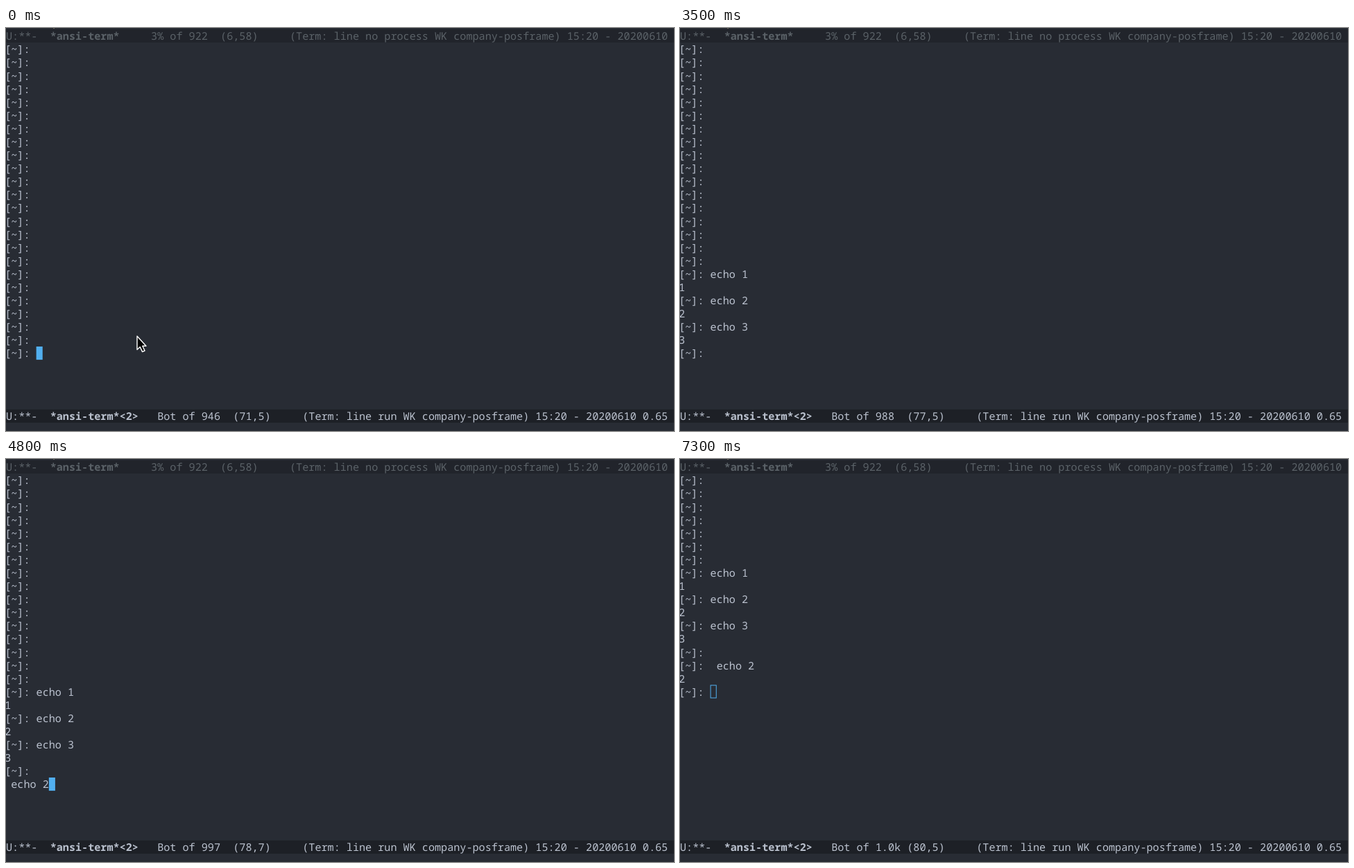
Recreate the animation shown at these times as an HTML page. Size 963x582 px, loop 7500 ms.

```html
<!DOCTYPE html>
<html lang="en">
<head>
<meta charset="utf-8">
<title>Shell history</title>
<style>
  html, body { margin: 0; width: 100%; height: 100%; overflow: hidden; background: #282c34; }
  svg { display: block; width: 963px; height: 582px; }
  text {
    font: 16.6667px "Noto Sans Mono", "DejaVu Sans Mono", monospace;
    white-space: pre;
    text-rendering: geometricPrecision;
  }
  .bold { font-weight: 700; }
</style>
</head>
<body>
<svg id="stage" viewBox="0 0 1059.3 640.2"></svg>
<script>
const LOOP = 7500;
const CW = 10, LH = 21, ASCENT = 17;      // character cell
const LEFT = -2, TOP = 23, BOTTOM = 606;  // text area
const SPLIT = 271;                        // middle mode line when helm is open
const HELM_ON = 3600, HELM_MOVE = 4300, HELM_OFF = 4700;
const PROMPT = '[~]: ';
const C = {
  fg: '#bbc2cf', dim: '#5b6268', bar: '#1d2026', barDim: '#21242b',
  blue: '#51afef', select: '#2257a0', head: '#23272e', yellow: '#ffff00'
};

// Key presses; '>' stands for the shell printing its answer and a new prompt.
const KEYS = [
  [300, 'e'], [500, 'c'], [600, 'h'], [700, 'o'], [800, ' '], [1000, '1'], [1100, '\n>e'],
  [1300, 'c'], [1400, 'ho'], [1500, ' '], [1700, '2'], [1800, '\n'], [1900, '>'],
  [2000, 'e'], [2100, 'c'], [2200, 'h'], [2300, 'o'], [2400, ' '], [2700, '3'],
  [3000, '\n'], [3100, '>'], [4800, '\n echo 2'], [5500, '\n'], [5600, '>']
];
const BLINK_OFF = [[3500, 3600], [5300, 5500], [6000, 6500]];

const stage = document.getElementById('stage');
const within = (t, a, b) => t >= a && t < b;

const rect = (x, y, w, h, fill) =>
  `<rect x="${x}" y="${y}" width="${w}" height="${h}" fill="${fill}"/>`;

const text = (x, y, str, fill = C.fg, bold = false) =>
  str.trim() ? `<text x="${x}" y="${y + ASCENT}" fill="${fill}"${bold ? ' class="bold"' : ''}>${
    str.replace(/&/g, '&amp;').replace(/</g, '&lt;')}</text>` : '';

const bar = (y, fill) => rect(0, y, 1060, LH, fill);

const block = (col, y) => rect(LEFT + col * CW, y, CW, LH, C.blue);

const hollow = (col, y) =>
  `<rect x="${LEFT + col * CW + .5}" y="${y + .5}" width="${CW - 1}" height="${LH - 1}" fill="none" stroke="${C.blue}" stroke-width="1.1"/>`;

function session(t) {
  const lines = Array(71).fill(PROMPT);
  let size = 946;
  const put = s => { lines[lines.length - 1] += s; size += s.length; };
  const newline = () => { lines.push(''); size++; };
  const answer = () => {
    const i = lines.length - 2;
    if (!lines[i].startsWith(PROMPT)) { lines[i] = PROMPT + lines[i]; size += PROMPT.length; }
    put(lines[i].slice(-1));
    newline();
    put(PROMPT);
  };
  for (const [time, keys] of KEYS) {
    if (time > t) break;
    for (const k of keys) k === '\n' ? newline() : k === '>' ? answer() : put(k);
  }
  if (t >= HELM_ON) size++;
  return { lines, size };
}

function modeLine(y, name, place, pos, status, active) {
  const fg = active ? C.fg : C.dim;
  const start = 7 + name.length + (name.endsWith('>') ? 3 : 5);
  const posCol = name.endsWith('>') ? 36 : 34;
  return bar(y, active ? C.bar : C.barDim)
    + text(0, y, 'U:**-', fg)
    + text(7 * CW, y, name, fg, true)
    + text(start * CW, y, place, fg)
    + text(posCol * CW, y, pos.padEnd(11) + `(Term: line ${status} WK company-posframe) 15:20 - 20200610 0.65`, fg);
}

function helm(t) {
  const picked = t < HELM_MOVE ? 0 : 1;
  let y = SPLIT + LH;
  let out = text(LEFT, y, 'C-j: helm-shell-history-command-action (keeping session)');
  y += LH;
  out += bar(y, C.head) + text(LEFT, y, 'Shell history', C.blue, true);
  ['52', '50', '50'].forEach((sec, i) => {
    y += LH;
    if (i === picked) out += bar(y, C.select);
    out += text(LEFT + 2 * CW, y, `${163 - i}  20200610 15:20:${sec} echo ${3 - i}`, C.fg, i === picked);
  });
  out += bar(BOTTOM, C.bar)
    + text(0, BOTTOM, '*Helm Shell History*', C.fg, true)
    + text(21 * CW, BOTTOM, 'L' + (picked + 1))
    + rect(27 * CW, BOTTOM, 18 * CW, LH, C.yellow)
    + text(27 * CW, BOTTOM, '[3 Candidate(s)]', '#000')
    + text(46 * CW, BOTTOM, 'C-h m:Help C-z:Act RET/f1/f2/f-n:NthAct C-!:Tog.suspend C-h')
    + text(LEFT, BOTTOM + LH, 'Find command:', C.blue);
  if (!within(t, 4100, HELM_MOVE)) out += block(14, BOTTOM + LH);
  return out;
}

function pointer(t) {
  let x = 189, y = 445;
  if (t >= 300) {
    if (!within(t, 6700, 7300)) return '';
    const k = Math.floor((t - 6700) / 100) / 5;
    x = 181 - 14 * k;
    y = 364 - 363 * k * k * (3 - 2 * k);
  }
  return `<path transform="scale(1.1) translate(${x} ${y})" d="M0 0V19.5L4.3 15.6L7.6 22.6L11 21L7.8 14.2H13Z"
    fill="#000" stroke="#fff" stroke-width="1.4" stroke-linejoin="round"/>`;
}

function draw(t) {
  const { lines, size } = session(t);
  const helmOpen = within(t, HELM_ON, HELM_OFF);
  const last = lines.length - 1;
  const row = helmOpen ? 8 : t < 5500 ? 23 : lines.length - 64;
  const col = lines[last].length;
  const y = TOP + row * LH;

  let out = rect(0, 0, 1060, 641, '#282c34')
    + rect(75, 0, 2, 1, '#77705f')
    + modeLine(2, '*ansi-term*', '3% of 922', '(6,58)', 'no process', helmOpen);
  for (let r = 0; r <= row; r++) out += text(LEFT, TOP + r * LH, lines[last - row + r]);

  if (helmOpen || t >= 7300) out += hollow(col, y);
  else if (!BLINK_OFF.some(([a, b]) => within(t, a, b))) out += block(col, y);

  const total = size < 1000 ? size : (size / 1000).toFixed(1) + 'k';
  out += modeLine(helmOpen ? SPLIT : BOTTOM, '*ansi-term*<2>',
    `${helmOpen ? '94%' : 'Bot'} of ${total}`, `(${lines.length},${col})`, 'run', true);
  if (helmOpen) out += helm(t);
  return out + pointer(t);
}

let shown = '';
function tick() {
  const next = draw(performance.now() % LOOP);
  if (next !== shown) stage.innerHTML = shown = next;
  requestAnimationFrame(tick);
}
tick();
</script>
</body>
</html>
```
